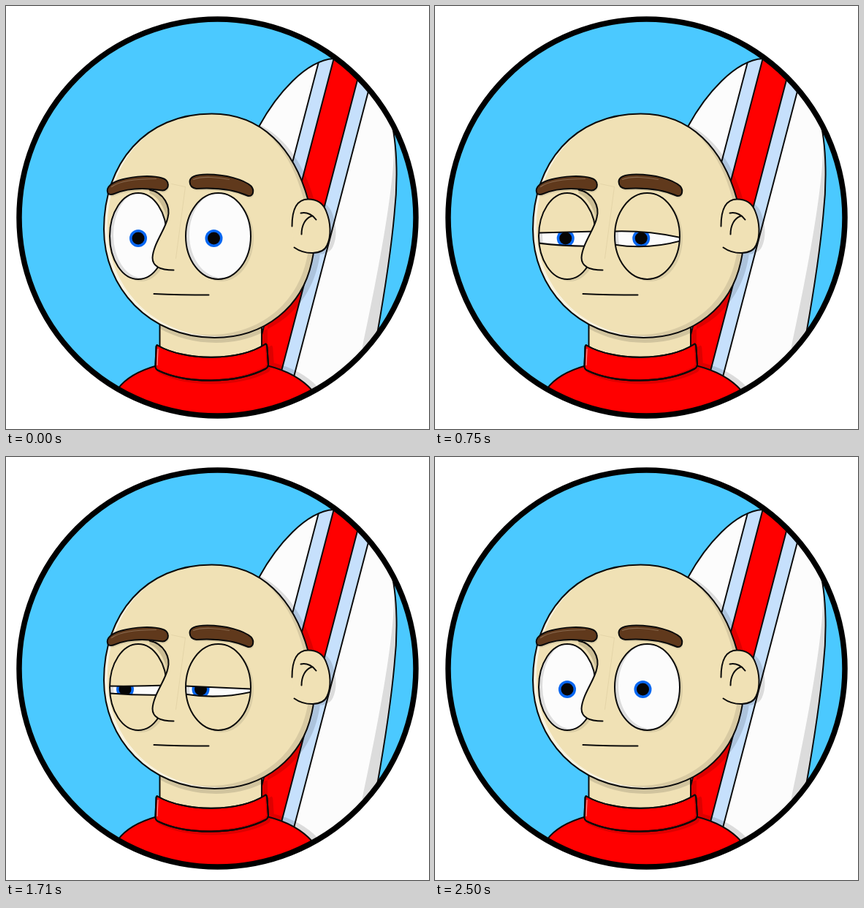
Animation, 579 px wide and 579 px high, one loop 2.54 s. Source, as an HTML page with a canvas:

```html
<!DOCTYPE html>
<html lang="en">
<head>
<meta charset="utf-8">
<title>Surfer</title>
<style>
html, body { margin: 0; width: 100%; height: 100%; overflow: hidden; background: #fff; }
canvas { display: block; width: 579px; height: 579px; }
</style>
</head>
<body>
<canvas id="stage" width="579" height="579"></canvas>
<script>
const ctx = document.getElementById('stage').getContext('2d');
const LOOP = 2540;
const SKIN = '#f0e1b5', INK = '#0b0b0b', RED = '#ff0000', WHITE = '#fcfcfc', PALE = '#c6e0fc';
const SHADE = 'rgba(0,0,0,.13)';

const path = d => new Path2D(d);
const oval = (x, y, rx, ry = rx) => {
  const p = new Path2D();
  p.ellipse(x, y, rx, ry, 0, 0, Math.PI * 2);
  return p;
};
const shifted = (p, dx, dy) => {
  const q = new Path2D();
  q.addPath(p, new DOMMatrix([1, 0, 0, 1, dx, dy]));
  return q;
};

const disc = oval(289.5, 289.5, 271.5);
const board = path('M346 164C370 120 410 74 448 71.5L600 40L525 150C537 192 535 250 531 285C526 340 517 395 508 446L470 600H300L320 300Z');
const boardShade = path('M531 180C532 240 512 350 487 468L530 460L545 200Z');
const head = path('M281 147C350 147 394 195 413 265C422 293 424 326 418 350C405 410 355 453.5 285 453.5C195 453.5 133.5 385 133.5 305C133.5 215 190 147 281 147Z');
const ear = path('M391 301C391 283 395 264 413 264C425 264 434 270 438 281C444 296 445 314 439 327C433 341 408 340 394 330');
const earFold = path('M404 312C404 300 409 290 418 287M403 283C412 281 420 286 424 292');
const neck = path('M210 435V485H349.5V435Z');
const body = path('M153 523C165 507 184 498 205 492H358C382 498 403 508 419 526L400 600H160Z');
const collar = path('M207 464C245 486 318 486 355 462Q357 463 357 468L358.5 490Q358.5 494 355 496C315 517 246 517 207 498Q203.5 496 204 491L205 467Q205 463 207 464Z');
const noseLine = 'M196 251C216 255 225 274 221 289C218 305 201 325 200 344C200 358 214 361 229 361';
const noseSide = path(noseLine + 'L234 340L243 250Z');
const noseShade = path('M196 251C216 255 225 274 220 291C216 274 207 260 196 256Z');
const brows = [
  path('M139 256C135 247 146 240 158 237C176 232 200 231 213 235C224 238 224 251 214 252C190 248 166 249 149 256Q142 259 139 256Z'),
  path('M251 240C251 232 262 230 275 230C300 230 325 237 335 246C340 252 338 260 331 259.5C310 250 285 248 260 249.5Q251 248 251 240Z')
];
const browShine = path('M144 247C155 239 180 236 205 236M256 237C268 232 290 234 305 237');

// Each lid edge holds the heights at the left, middle and right of its eye.
const OPEN = [[277, 252, 277], [355, 379, 355]];
const eyes = [
  { x: 180.5, rx: 39, iris: 180.5, open: OPEN,
    sleepy: [[310, 309, 308], [324, 327.5, 328]],
    squint: [[313, 313, 312], [323, 325, 325]] },
  { x: 290, rx: 44.5, iris: 284, open: OPEN,
    sleepy: [[308, 309.5, 316.5], [326, 328.5, 321]],
    squint: [[313, 315, 317], [324, 327, 321]] }
];

function fill(p, color, rule) { ctx.fillStyle = color; ctx.fill(p, rule); }
function stroke(p, width = 2, color = INK) {
  ctx.lineWidth = width;
  ctx.strokeStyle = color;
  ctx.stroke(p);
}
function solid(p, color) { fill(p, color); stroke(p); }
function within(p, draw) {
  ctx.save();
  ctx.clip(p);
  draw();
  ctx.restore();
}
// Shades the part of a shape that a moved copy of it leaves uncovered.
function rim(p, dx, dy, color) {
  within(p, () => {
    const outside = shifted(p, dx, dy);
    outside.rect(0, 0, 579, 579);
    fill(outside, color, 'evenodd');
  });
}

const mix = (a, b, k) => a + (b - a) * k;
const progress = (t, start) => t < start ? 0 : Math.min(1, (t - start + 40) / 540);
const easeOut = k => 1 - (1 - k) ** 8;

function poseAt(t) {
  if (t < 630) {
    const k = easeOut(progress(t, 40));
    return { from: 'open', to: 'sleepy', k, look: -6 * k };
  }
  if (t < 1210) {
    const u = progress(t, 630);
    return { from: 'sleepy', to: 'sleepy', k: 1, look: -6.3 + 5 * Math.sin(Math.PI * u) };
  }
  if (t < 1750) {
    const k = easeOut(progress(t, 1210));
    return { from: 'sleepy', to: 'squint', k, look: mix(-6.3, -18, k) };
  }
  const k = easeOut(progress(t, 1750));
  return { from: 'squint', to: 'open', k, look: mix(-18, 0, k) };
}

function drawBoard() {
  fill(board, WHITE);
  within(board, () => {
    const edge = (x, y) => x - .261 * (y - 74);
    const stripe = (a, b, color) =>
      fill(path(`M${edge(a, 0)} 0L${edge(b, 0)} 0L${edge(b, 579)} 579L${edge(a, 579)} 579Z`), color);
    const lines = [428, 447.5, 487.5, 506.5];
    [PALE, RED, PALE].forEach((color, i) => stripe(lines[i], lines[i + 1], color));
    for (const x of lines) stroke(path(`M${edge(x, 0)} 0L${edge(x, 579)} 579`));
    fill(boardShade, SHADE);
    const cast = shifted(head, 9, 2);
    for (const p of [ear, neck, collar]) cast.addPath(shifted(p, 8, 2));
    cast.addPath(shifted(body, 8, -4));
    fill(cast, SHADE);
  });
  stroke(board);
}

function drawEye(eye, pose) {
  const { x, rx } = eye, left = x - rx - 1, right = x + rx + 1;
  const ball = oval(x, 314.5, rx, 59);
  fill(shifted(ball, 4, 3), 'rgba(0,0,0,.09)');
  fill(ball, WHITE);
  rim(ball, 5, -2, 'rgba(0,0,0,.12)');
  within(ball, () => {
    fill(oval(eye.iris + pose.look, 317.5, 12), '#0867f2');
    fill(oval(eye.iris + pose.look, 317.5, 8.5), '#050505');
    [0, 1].forEach(i => {
      const [a, m, b] = eye[pose.from][i].map((y, j) => mix(y, eye[pose.to][i][j], pose.k));
      const curve = `M${left} ${a}Q${x} ${2 * m - (a + b) / 2} ${right} ${b}`;
      const end = i ? 390 : 240;
      fill(path(`${curve}V${end}H${left}Z`), SKIN);
      stroke(path(curve));
    });
  });
  stroke(ball);
}

function drawFace(pose) {
  fill(head, SKIN);
  rim(head, -7, -4, 'rgba(0,0,0,.1)');
  rim(head, 5, -2, 'rgba(255,255,255,.6)');
  stroke(head);
  fill(ear, SKIN);
  stroke(ear);
  stroke(earFold);
  drawEye(eyes[0], pose);
  fill(noseSide, SKIN);
  fill(noseShade, '#cbbd94');
  stroke(path(noseLine));
  stroke(path('M226 243L245 247L232 345'), 1, 'rgba(120,100,50,.1)');
  drawEye(eyes[1], pose);
  for (const brow of brows) {
    fill(shifted(brow, 1, 3), 'rgba(0,0,0,.08)');
    solid(brow, '#60391c');
  }
  stroke(browShine, 1.2, '#8a6a4e');
  stroke(path('M202 393.5Q238 395 277 395'));
}

function draw(t) {
  ctx.fillStyle = '#fff';
  ctx.fillRect(0, 0, 579, 579);
  ctx.lineCap = ctx.lineJoin = 'round';
  fill(disc, '#4bc9ff');
  within(disc, () => {
    ctx.translate(.5, .5);
    drawBoard();
    solid(neck, SKIN);
    within(neck, () => fill(shifted(head, 2, 7), SHADE));
    solid(body, RED);
    within(body, () => fill(shifted(collar, 3, 5), SHADE));
    solid(collar, RED);
    rim(collar, -3, -2, SHADE);
    stroke(path('M207.5 469L206.5 491'), 1.2, '#ff9c9c');
    stroke(collar);
    drawFace(poseAt(t));
  });
  stroke(disc, 7.5, '#000');
}

const start = performance.now();
function tick() {
  draw((performance.now() - start) % LOOP);
  requestAnimationFrame(tick);
}
tick();
</script>
</body>
</html>
```
